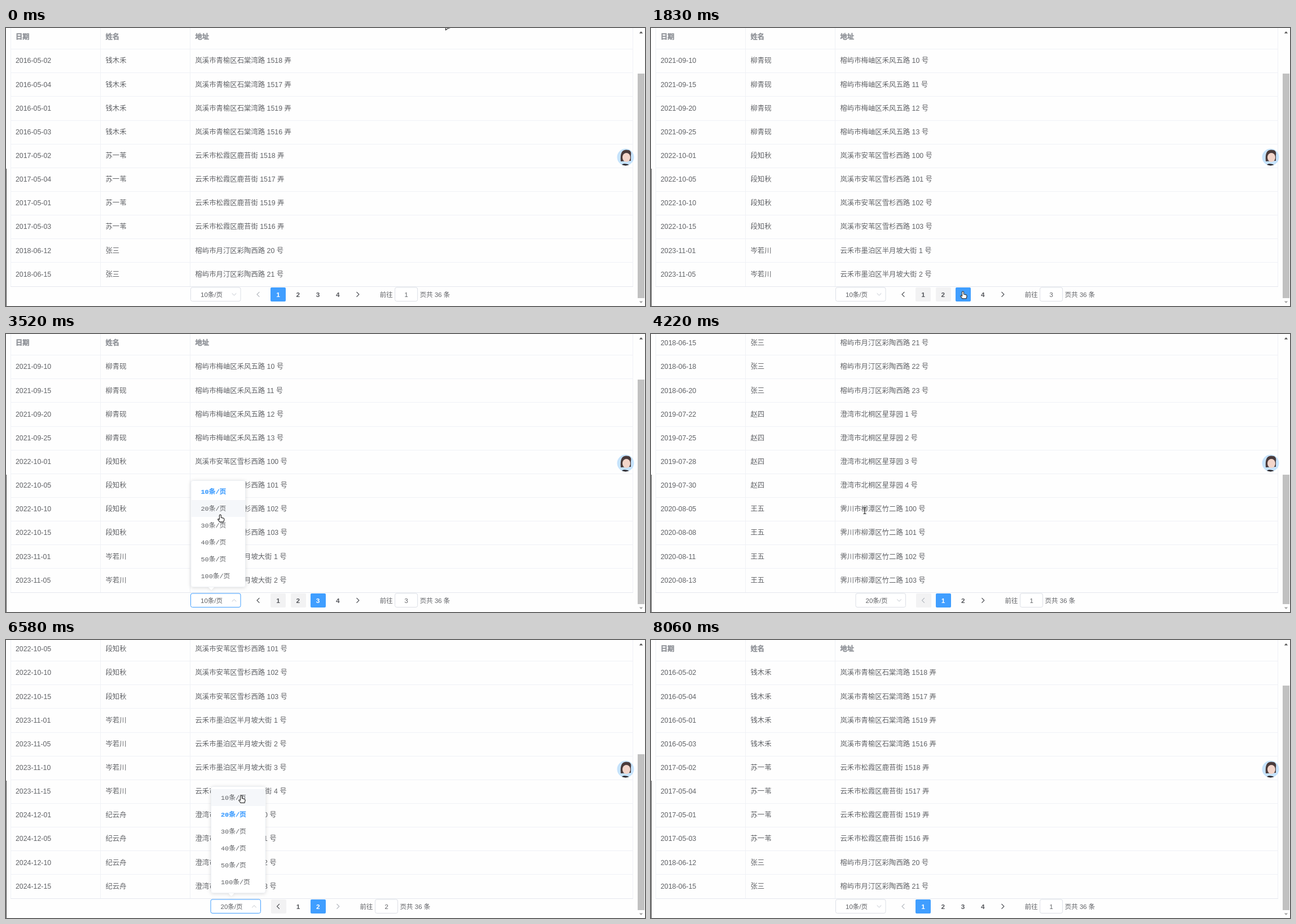
An HTML page that plays this animation: 1133x494 px, repeating every 8160 ms.

```html
<!DOCTYPE html>
<html lang="zh-CN">
<head>
<meta charset="utf-8">
<title>表格分页</title>
<style>
html, body { margin: 0; width: 100%; height: 100%; overflow: hidden; background: #fefefe; }
svg { display: block; width: 100%; height: 100%; }
text { font: 12.36px "Liberation Sans", "Noto Sans CJK SC", "Noto Sans CJK", sans-serif; fill: #606266; white-space: pre; }
.head { font-weight: 700; fill: #909399; stroke: #909399; stroke-width: .4px; }
.small { font-size: 11.5px; }
.num { font-size: 11.8px; font-weight: 700; text-anchor: middle; fill: #55575c; }
.mid { text-anchor: middle; }
.option { font: 11.8px "Liberation Mono", "Noto Sans CJK SC", "Noto Sans CJK", monospace; }
.picked { font-weight: 700; fill: #409eff; stroke: #409eff; stroke-width: .2px; }
.crisp { shape-rendering: crispEdges; }
.line { fill: none; stroke-linecap: round; stroke-linejoin: round; }
</style>
</head>
<body>
<svg viewBox="0 0 1133 494">
  <defs>
    <filter id="shade" x="-20%" y="-20%" width="140%" height="140%">
      <feDropShadow dx="0" dy="1" stdDeviation="3" flood-color="#000" flood-opacity=".14"/>
    </filter>
    <clipPath id="disc"><circle cx="1098.5" cy="229.5" r="15"/></clipPath>
  </defs>
  <g id="table"></g>
  <g id="pager"></g>
  <g class="crisp">
    <rect x="0" y="250" width="1" height="244" fill="#4a4a4a"/>
    <rect id="thumb" x="1120" width="12" fill="#c1c1c1"/>
  </g>
  <path d="M1122.8 9.5H1129.2L1126 6Z" fill="#505050"/>
  <path d="M1122.8 485.5H1129.2L1126 489Z" fill="#a3a3a3"/>
  <g clip-path="url(#disc)">
    <rect x="1083" y="214" width="31" height="31" fill="#c6e3fc"/>
    <path d="M1090 237Q1088 217 1099 216.500T1108 226V236Z" fill="#4a3b3b"/>
    <ellipse cx="1100" cy="230" rx="7" ry="8" fill="#f3d5ca"/>
    <path d="M1091 245Q1092 240.500 1099 241.500T1107 245Z" fill="#29262b"/>
  </g>
  <g id="popup"></g>
  <g id="cursor" class="line" stroke="#333" stroke-width="1.2">
    <path id="arrow" fill="#fff" d="M.5.5V12.700L4 10 9 8.500Z"/>
    <path id="hand" fill="#fff" d="M-1.500 7V1Q0-1 1.500 1V5L6 6.200Q7.500 7 7 9L6 12.800H-1L-4.300 8.500Q-4 6.500-1.500 8.500Z"/>
    <path id="beam" d="M-2.200-5.500H-.8L0-4.800.8-5.500H2.200M0-4.800V4.800M-2.200 5.500H-.8L0 4.800.8 5.500H2.200"/>
  </g>
</svg>
<script>
const LOOP = 8160, ROW = 42.15, BOTTOM = 459, STEP = 35.3, FIRST = 155;
const $ = id => document.getElementById(id);

// name, month, days, address, house numbers, unit
const groups = [
  ['钱木禾', '2016-05', '02 04 01 03', '岚溪市青榆区石棠湾路', '1518 1517 1519 1516', '弄'],
  ['苏一苇', '2017-05', '02 04 01 03', '云禾市松霞区鹿苔街', '1518 1517 1519 1516', '弄'],
  ['张三', '2018-06', '12 15 18 20', '榕屿市月汀区彩陶西路', '20 21 22 23', '号'],
  ['赵四', '2019-07', '22 25 28 30', '澄湾市北桐区星芽园', '1 2 3 4', '号'],
  ['王五', '2020-08', '05 08 11 13', '霁川市柳潭区竹二路', '100 101 102 103', '号'],
  ['柳青砚', '2021-09', '10 15 20 25', '榕屿市梅岫区禾风五路', '10 11 12 13', '号'],
  ['段知秋', '2022-10', '01 05 10 15', '岚溪市安苇区雪杉西路', '100 101 102 103', '号'],
  ['岑若川', '2023-11', '01 05 10 15', '云禾市墨泊区半月坡大街', '1 2 3 4', '号'],
  ['纪云舟', '2024-12', '01 05 10 15', '澄湾市丰荻区荻花路', '50 51 52 53', '号']
];
const people = groups.flatMap(([name, month, days, street, houses, unit]) => {
  const house = houses.split(' ');
  return days.split(' ').map((day, i) => [`${month}-${day}`, name, `${street} ${house[i]} ${unit}`]);
});

// start, rows per page, page
const views = [[0, 10, 1], [1165, 10, 2], [1540, 10, 3], [3745, 20, 1], [4790, 20, 2], [6680, 10, 1]];
// open, close, rows per page, left edge of the select
const menus = [[2900, 3745, 10, 327.5], [5640, 6680, 20, 363]];
// time, x, y of the pointer
const path = [
  [0, 779, -9], [60, 779, -9], [800, 520, 461], [900, 517, 465], [1140, 517, 465],
  [1165, 544, 475], [1270, 544, 475], [1360, 549, 480], [1500, 553, 468], [1930, 553, 468],
  [2020, 560, 468], [2340, 624, 468], [2750, 398.5, 464.5], [3000, 398.5, 464.5], [3600, 379, 314],
  [4300, 379, 314], [4700, 551, 468], [4950, 551, 468], [5420, 426, 467.5], [5750, 426, 467.5],
  [6400, 417, 276.5], [7100, 417, 276.5], [7800, 803, -20], [LOOP, 803, -20]
];

const clamp = v => Math.max(0, Math.min(1, v));
const ease = v => v * v * (3 - 2 * v);
const ramp = (t, from, to) => ease(clamp((t - from) / (to - from)));
const text = (x, y, str, cls = '') => `<text x="${x}" y="${y + 4.4}" class="${cls}">${str}</text>`;
const rect = (x, y, w, h, fill, more = '') =>
  `<rect x="${x}" y="${y}" width="${w}" height="${h}" fill="${fill}" ${more}/>`;
const stroke = (d, color, width = 1.3) =>
  `<path class="line" d="${d}" stroke="${color}" stroke-width="${width}"/>`;

function tableMarkup(rows) {
  const cols = [17, 176.5, 335.5], border = '#eff1f6';
  const top = BOTTOM - (rows.length + 1) * ROW;
  let out = '';
  [['日期', '姓名', '地址'], ...rows].forEach((cells, i) => {
    const end = top + (i + 1) * ROW;
    const last = i === rows.length;
    out += rect(8, Math.round(end - .4), 1104, 1, last ? '#e4e7ee' : border, 'class="crisp"');
    cells.forEach((cell, c) => out += text(cols[c], end - 21.7, cell, i ? '' : 'head'));
  });
  for (const x of [8, 167, 326, 1111])
    out += rect(x, top, 1, BOTTOM - top, border, 'class="crisp"');
  return out;
}

function pagerMarkup(size, page, open) {
  const count = Math.ceil(people.length / size);
  const left = size === 10 ? 327.5 : 363;
  const x = k => left + FIRST + STEP * k;
  const next = x(count), cy = 473.4;
  const button = (cx, fill) => rect(Math.round(cx - 13.2), 461, 27, 25, fill, 'rx="2"');
  const box = (bx, w, color) => rect(bx, 461, w, 24.5, '#fff', `rx="3" stroke="${color}"`);
  const tone = off => off ? '#b4b8bf' : '#4c4e53';
  const bend = open ? -1.7 : 1.7;
  let out = box(left, 88.5, open ? '#409eff' : '#dcdfe6') + text(left + 17.5, cy - .3, size + '条/页', 'small');
  out += stroke(`M${left + 73.5} ${cy - bend}l3.5 ${2 * bend}l3.5 ${-2 * bend}`, '#c0c4cc', 1);
  if (size === 20) out += button(x(-1), '#f2f2f3');
  out += stroke(`M${x(-1) + 1.8} ${cy - 4}l-4 4l4 4`, tone(page === 1));
  for (let k = 0; k < count; k++) {
    const on = k + 1 === page;
    if (on) out += button(x(k), '#409eff');
    else if (size === 10 && k + 1 < page) out += button(x(k), '#f2f2f3');
    out += `<text class="num" x="${x(k)}" y="${cy + 4.2}"${on ? ' style="fill:#fff"' : ''}>${k + 1}</text>`;
  }
  out += stroke(`M${next - 1.8} ${cy - 4}l4 4l-4 4`, tone(page === count));
  out += text(next + 39, cy - .3, '前往', 'small') + box(next + 66, 40, '#dcdfe6');
  out += text(next + 86, cy - .3, page, 'small mid') + text(next + 110, cy - .3, `页共 ${people.length} 条`, 'small');
  return out;
}

function popupMarkup(size, left, hover) {
  let out = `<g filter="url(#shade)"><path d="M${left + 31} 449h11l-5.5 6z" fill="#fff"/>`
    + rect(left + .5, 260.5, 96.5, 189, '#fff', 'rx="3.5" stroke="#e9ecf2" stroke-width=".8"') + '</g>';
  [10, 20, 30, 40, 50, 100].forEach((n, i) => {
    if (i === hover) out += rect(left + 1, 265 + 30 * i, 95.5, 30, '#f5f7fa');
    out += text(left + 18, 279.7 + 30 * i, n + '条/页', 'option' + (n === size ? ' picked' : ''));
  });
  return out;
}

const cache = {};
function fill(id, key, make) {
  if (cache[id] === key) return;
  cache[id] = key;
  $(id).innerHTML = make();
}

function pointer(t) {
  const i = Math.max(1, path.findIndex(p => p[0] > t));
  const [a, b] = [path[i - 1], path[i]];
  const k = ramp(t, a[0], b[0]);
  return [a[1] + (b[1] - a[1]) * k, a[2] + (b[2] - a[2]) * k];
}

function cursorKind(x, y, size, count, menu) {
  const left = size === 10 ? 327.5 : 363;
  if (menu && y > 261 && y < 452) return 'hand';
  if (y > 460 && y < 486) {
    if (x > left && x < left + 88) return 'hand';
    for (let k = -1; k <= count; k++)
      if (Math.abs(x - left - FIRST - STEP * k) < 8.5) return 'hand';
  }
  const offset = ((BOTTOM - 21.7 - y) % ROW + ROW) % ROW;
  const onText = Math.min(offset, ROW - offset) < 9;
  return y < 455 && x > 336 && x < 490 && onText ? 'beam' : 'arrow';
}

function draw(t) {
  const [, size, page] = views.filter(v => v[0] <= t).pop();
  const rows = people.slice((page - 1) * size, page * size);
  const menu = menus.find(m => t >= m[0] && t < m[1]);
  const shown = menus.find(m => t >= m[0] && t < m[1] + 180);
  const [x, y] = pointer(t);

  // the longer page is scrolled down to its end
  const drop = size === 20 && page === 1 ? 10 * ROW * (1 - ramp(t, 3800, 4130)) : 0;
  const shift = `translate(0 ${drop.toFixed(2)})`;
  fill('table', size + '/' + page, () => tableMarkup(rows));
  fill('pager', [size, page, !!menu].join(), () => pagerMarkup(size, page, !!menu));
  $('table').setAttribute('transform', shift);
  $('pager').setAttribute('transform', shift);

  const full = 575.7 + (rows.length - 10) * ROW;
  const len = Math.round(494 * 465 / full);
  $('thumb').setAttribute('y', Math.round(480 - len - drop * 465 / full));
  $('thumb').setAttribute('height', len);

  if (shown) {
    const [from, to, n, left] = shown;
    const hover = y > 265 && y < 445 ? Math.floor((y - 265) / 30) : -1;
    const grow = ramp(t, from, from + 220) * (1 - ramp(t, to, to + 180));
    fill('popup', [n, hover].join(), () => popupMarkup(n, left, hover));
    $('popup').setAttribute('opacity', grow);
    $('popup').setAttribute('transform', `translate(0 ${452 * (1 - grow)}) scale(1 ${grow})`);
  }
  $('popup').style.display = shown ? '' : 'none';

  const kind = cursorKind(x, y, size, Math.ceil(people.length / size), menu);
  for (const id of ['arrow', 'hand', 'beam']) $(id).style.display = id === kind ? '' : 'none';
  $('cursor').setAttribute('transform', `translate(${x.toFixed(1)} ${y.toFixed(1)})`);
}

const start = performance.now();
function tick() {
  draw((performance.now() - start) % LOOP);
  requestAnimationFrame(tick);
}
tick();
</script>
</body>
</html>
```
